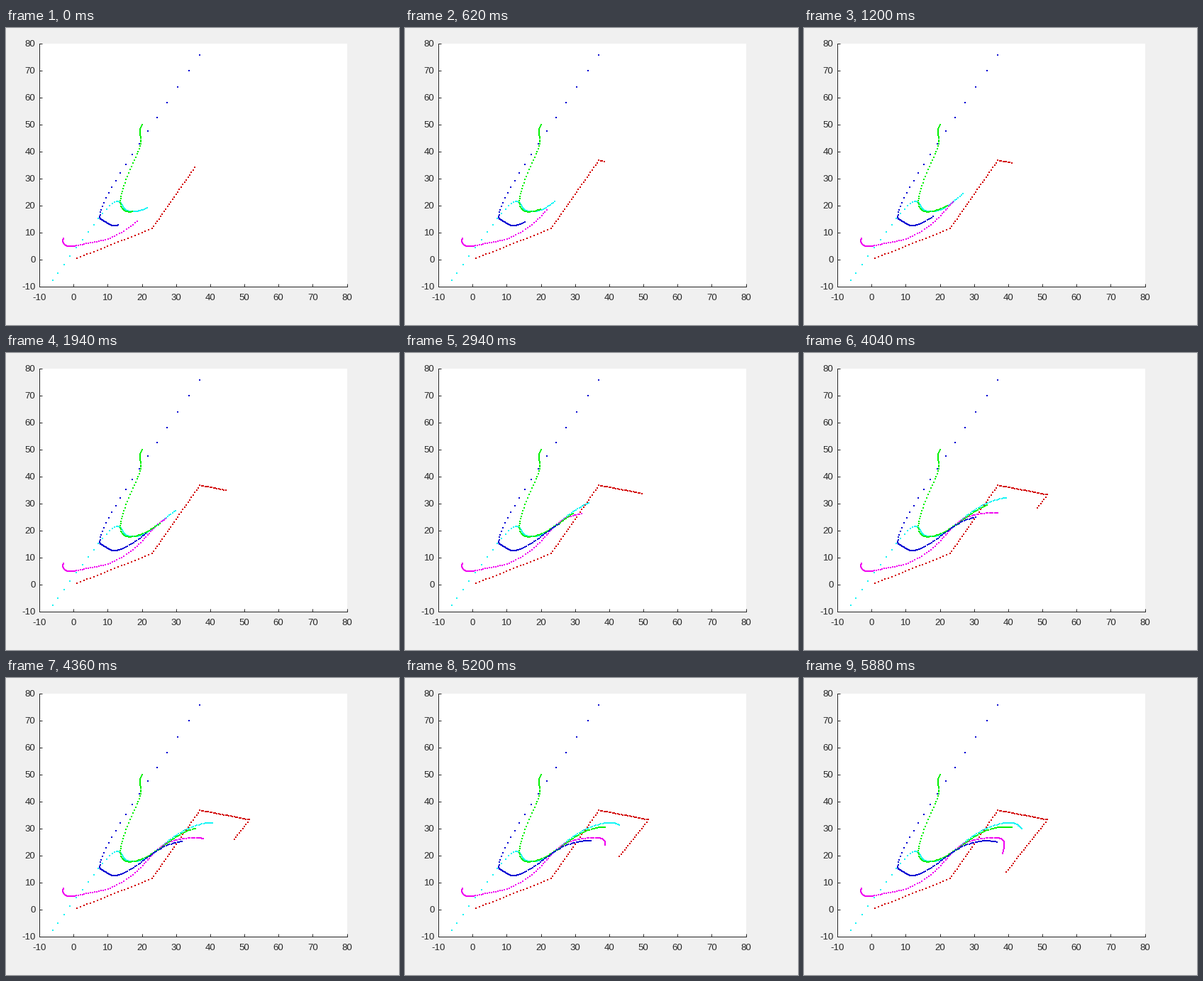
Animation, 554 px wide and 418 px high, one loop 5920 ms. Source, as a matplotlib script:

```python
import matplotlib.pyplot as plt
import numpy as np
from matplotlib.animation import FuncAnimation

W, H, DPI = 554, 418, 64
PX = 72 / DPI  # points per pixel
LEFT, RIGHT, TOP, BOTTOM = 47, 480.5, 22, 364
LOW, HIGH = -10, 80
FRAMES, INTERVAL = 296, 20
START, TOTAL = 48, 104  # dots per trail at the start and the end
DOT_MS = 21             # one new dot, each trail in turn

INK = "#262626"
step = np.arange(TOTAL)


def spline(t, k, v):
    """Natural cubic spline through the values v at k."""
    h, n = np.diff(k), len(k)
    m, rhs = np.eye(n), np.zeros(n)
    for i in range(1, n - 1):
        m[i, i - 1:i + 2] = h[i - 1], 2 * (h[i - 1] + h[i]), h[i]
        rhs[i] = 6 * ((v[i + 1] - v[i]) / h[i] - (v[i] - v[i - 1]) / h[i - 1])
    bend = np.linalg.solve(m, rhs)
    i = np.clip(np.searchsorted(k, t, side="right") - 1, 0, n - 2)
    b = (t - k[i]) / h[i]
    a = 1 - b
    return (a * v[i] + b * v[i + 1]
            + ((a**3 - a) * bend[i] + (b**3 - b) * bend[i + 1]) * h[i]**2 / 6)


# Steps at which every pursuer passes one of its key points
KEYS = np.array([0, 6, 12, 18, 25, 35, 47, 61, 75, 89, 103])


def pursuer(x, y):
    return np.column_stack([spline(step, KEYS, np.array(v)) for v in (x, y)])


def leader():
    # Straight legs between corners
    k = [0, 22, 50, 79, 103]
    return np.column_stack([
        np.interp(step, k, [1, 23, 37, 51.5, 39.5]),
        np.interp(step, k, [0.5, 11.5, 36.8, 33.3, 14]),
    ])


trails = [
    ("#14f5f5", pursuer(
        [-13, -4.5, 5.9, 12.1, 14.5, 17.1, 21.5, 27.6, 34.1, 40.7, 43.9],
        [-19.6, -4.9, 13, 21.3, 19.7, 17.8, 19.3, 25.3, 30.3, 32.2, 30.1])),
    ("#0000d2", pursuer(
        [37, 19.3, 10.3, 7.8, 8.4, 10.3, 13.1, 19, 25.2, 31.7, 36.7],
        [75.9, 43, 24.7, 16.7, 14.7, 13.2, 12.8, 16.8, 22.4, 25.3, 25.1])),
    ("#00f000", pursuer(
        [20, 19.4, 19.7, 18.2, 15.4, 13.8, 17.3, 23.5, 29.4, 35.6, 41],
        [50.1, 47, 43.6, 38, 29.7, 20.4, 17.8, 21.1, 26.4, 30.1, 30.4])),
    ("#f000f0", pursuer(
        [-3, -3, -1.8, 0.4, 4.4, 10.7, 18.6, 25.2, 31.9, 38.2, 38.3],
        [8, 6.3, 5.1, 5.1, 6.1, 8, 14.3, 22.9, 26.2, 26.1, 20.7])),
    ("#d20000", leader()),
]
N = len(trails)
# Interleave the trails in plotting order, step by step
dots = np.stack([path for _, path in trails], axis=1).reshape(-1, 2)
colors = [color for color, _ in trails] * TOTAL

plt.rcParams["font.family"] = "Liberation Sans"
fig = plt.figure(figsize=(W / DPI, H / DPI), dpi=DPI, facecolor="#f0f0f0")
ax = fig.add_axes([LEFT / W, 1 - BOTTOM / H,
                   (RIGHT - LEFT) / W, (BOTTOM - TOP) / H])
ax.set(xlim=(LOW, HIGH), ylim=(LOW, HIGH))
ticks = range(LOW, HIGH + 1, 10)
ax.set_xticks(ticks, [str(v) for v in ticks])
ax.set_yticks(ticks, [str(v) for v in ticks])
ax.tick_params(direction="in", length=4 * PX, width=PX, color=INK,
               labelcolor=INK, labelsize=13.3 * PX)
ax.tick_params(axis="x", pad=10 * PX)
ax.tick_params(axis="y", pad=5.5 * PX)
for side, spine in ax.spines.items():
    spine.set_visible(side in ("left", "bottom"))
    spine.set(linewidth=PX, color=INK)

scatter = ax.scatter(dots[:, 0], dots[:, 1], s=(2 * PX) ** 2, c=colors,
                     marker="s", linewidths=0, antialiased=False, zorder=2)


def update(frame):
    shown = min(N * START + round(frame * INTERVAL / DOT_MS), N * TOTAL)
    scatter.set_offsets(dots[:shown])
    scatter.set_facecolor(colors[:shown])
    return scatter,


anim = FuncAnimation(fig, update, frames=FRAMES, interval=INTERVAL,
                     repeat=True, repeat_delay=0, blit=False)
plt.show()
```
